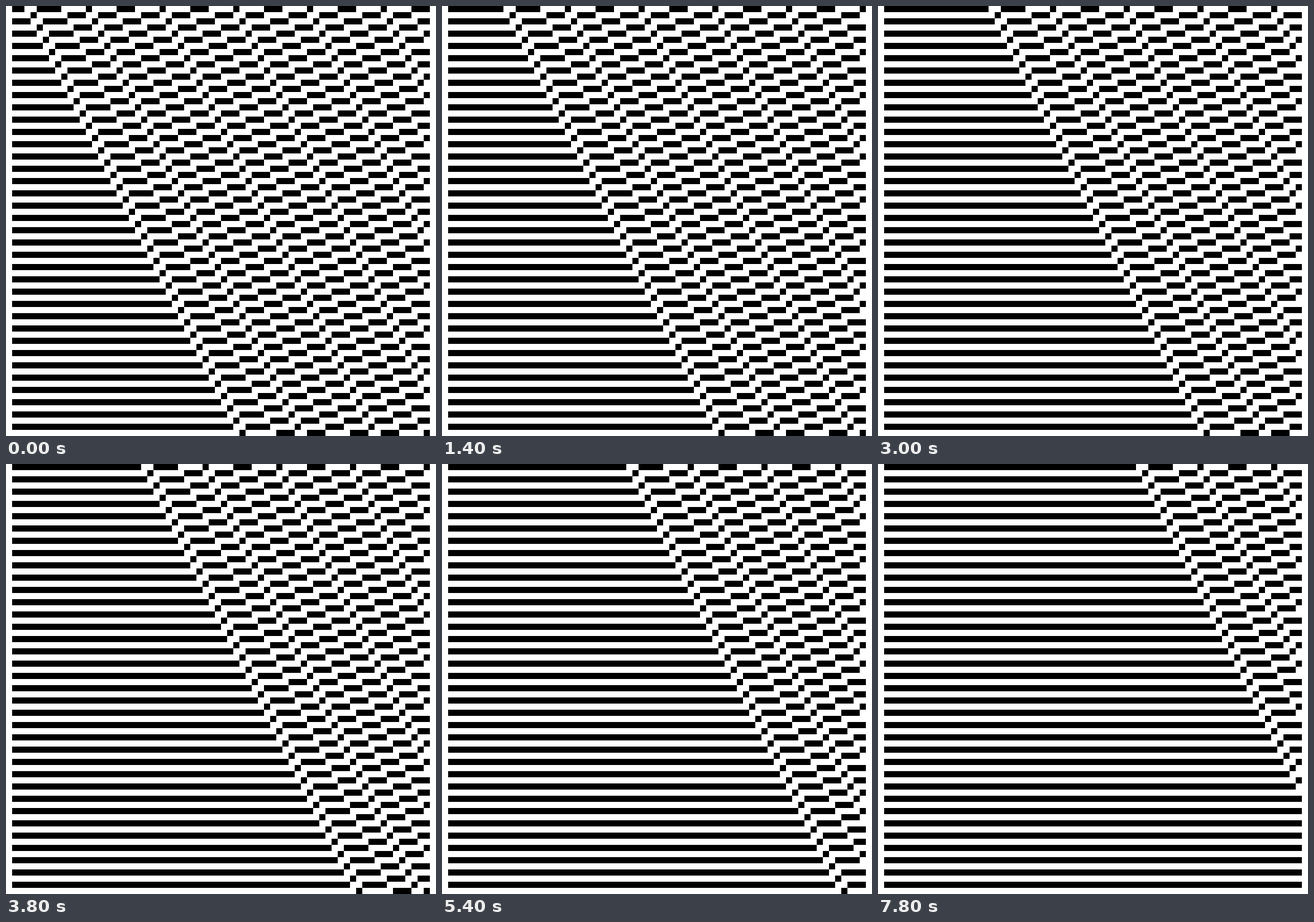
Write an HTML page with a canvas that moves like this. It is 700 by 700 pixels and loops after 8000 ms.

```html
<!DOCTYPE html>
<html lang="en">
<head>
<meta charset="utf-8">
<title>Cellular automaton</title>
<style>
  html, body { margin: 0; width: 100%; height: 100%; overflow: hidden; background: #fff; }
  canvas { display: block; width: 100%; height: 100%; image-rendering: pixelated; }
</style>
</head>
<body>
<canvas id="stage" width="700" height="700"></canvas>
<script>
const CELL = 10, SIZE = 70;
const STEP_MS = 200, STEPS = 40, ROWS_PER_STEP = 2;
const ctx = document.getElementById("stage").getContext("2d");

// First generation: two lead runs, then alternating runs of 1 and 3 with period 12.
function seed(col) {
  if (col < 13) return (col >= 1 && col <= 2) || (col >= 5 && col <= 8);
  return (col - 1) % 12 === 0 || (col - 6) % 12 < 3;
}

// Rule 3: a cell is alive when it and its left neighbour were dead; the borders stay dead.
const inside = col => col > 0 && col < SIZE - 1;
const nextRow = row => row.map((alive, col) => inside(col) && !alive && !row[col - 1]);

const rows = [Array.from({ length: SIZE }, (_, col) => inside(col) && seed(col))];
while (rows.length < SIZE + ROWS_PER_STEP * (STEPS - 1)) rows.push(nextRow(rows.at(-1)));

function draw(step) {
  ctx.fillStyle = "#fff";
  ctx.fillRect(0, 0, SIZE * CELL, SIZE * CELL);
  ctx.fillStyle = "#000";
  for (let y = 0; y < SIZE; y++) {
    rows[y + step * ROWS_PER_STEP].forEach((alive, x) => {
      if (alive) ctx.fillRect(x * CELL, y * CELL, CELL, CELL);
    });
  }
}

let shown = -1;
function tick() {
  const step = Math.floor(performance.now() / STEP_MS) % STEPS;
  if (step !== shown) draw(shown = step);
  requestAnimationFrame(tick);
}
tick();
</script>
</body>
</html>
```
